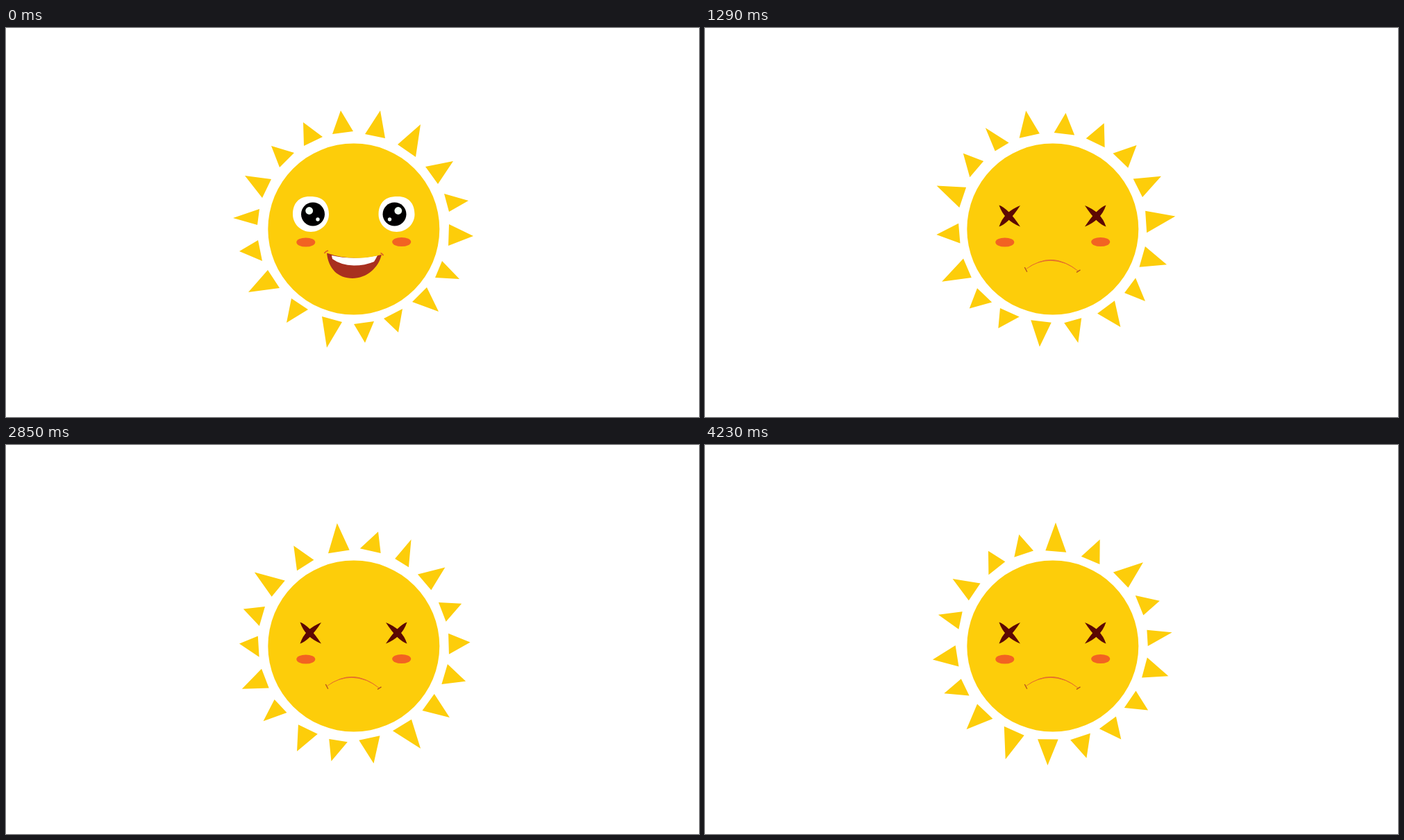
An HTML page with a canvas for the animation above (4.26 s loop, 998x561 px).

```html
<!DOCTYPE html>
<html lang="en">
<head>
<meta charset="utf-8">
<title>Sun</title>
<style>
html, body { margin: 0; width: 100%; height: 100%; overflow: hidden; background: #fff; }
canvas { display: block; width: 998px; height: 561px; }
</style>
</head>
<body>
<canvas id="stage"></canvas>
<script>
const W = 998, H = 561;
const LOOP = 4260, STEP = 30;
const SAD_AT = 450;
const SPEED = 40 * Math.PI / 180; // radians per second
const PIVOT = { x: 500, y: 288.4 };

const YELLOW = '#fdcd0a', CHEEK = '#f26322', MAROON = '#5c0803', LIP = '#a8301f', LINE = '#e5702c';

// Each ray: tip x, y and two base corners.
const RAYS = [
  [482, 119, 470, 153, 500, 149], [539, 119, 517, 153, 546, 159],
  [597, 139, 564, 168, 590, 186], [644, 192, 604, 200, 622, 225],
  [666, 249, 631, 239, 638, 265], [673, 300, 638, 283, 637, 314],
  [653, 362, 628, 336, 618, 360], [623, 409, 606, 374, 585, 395],
  [565, 439, 571, 405, 544, 419], [517, 454, 530, 423, 501, 427],
  [462, 461, 484, 424, 455, 416], [404, 425, 435, 406, 411, 390],
  [349, 381, 394, 375, 377, 349], [336, 322, 369, 336, 363, 306],
  [327, 274, 362, 284, 365, 261], [344, 213, 369, 245, 382, 218],
  [382, 170, 394, 201, 415, 180], [428, 136, 429, 170, 456, 157]
];

const canvas = document.getElementById('stage');
const ctx = canvas.getContext('2d');
const ratio = window.devicePixelRatio || 1;
canvas.width = Math.round(W * ratio);
canvas.height = Math.round(H * ratio);

const crown = new Path2D();
for (const [ax, ay, bx, by, cx, cy] of RAYS) {
  crown.moveTo(ax, ay);
  crown.lineTo(bx, by);
  crown.lineTo(cx, cy);
  crown.closePath();
}

function ellipse(x, y, rx, ry, color) {
  ctx.beginPath();
  ctx.ellipse(x, y, rx, ry, 0, 0, Math.PI * 2);
  ctx.fillStyle = color;
  ctx.fill();
}

const dot = (x, y, r, color) => ellipse(x, y, r, r, color);

function fill(path, color) {
  ctx.fillStyle = color;
  ctx.fill(new Path2D(path));
}

function line(path, color, width) {
  ctx.strokeStyle = color;
  ctx.lineWidth = width;
  ctx.stroke(new Path2D(path));
}

// Runs draw() flipped left to right, so that x becomes sum - x.
function mirrored(sum, draw) {
  ctx.save();
  ctx.translate(sum, 0);
  ctx.scale(-1, 1);
  draw();
  ctx.restore();
}

function openEye() {
  fill('M413 268.5C413 253 422 243 437 243C443 243 447 243.5 451 245' +
       'C460 248 465 258 465 268.5C465 283 453 294 439 294C425 294 413 283 413 268.5Z', '#fff');
  dot(442, 268.5, 17, '#000');
  dot(436.7, 263.5, 5.4, '#f4fff6');
  dot(449, 276, 2.7, '#f4fff6');
}

function crossEye() {
  fill('M423.5 255.5Q437 260.5 454 286.5Q430.5 277 423.5 255.5Z', MAROON);
  fill('M454 256Q437 282 423.5 286.5Q430.5 265 454 256Z', MAROON);
}

function happyFace() {
  openEye();
  mirrored(1001.5, openEye);
  fill('M462 324Q500 337 541 326C537 346 519 361 499 361C478 361 464 347 462 324Z', LIP);
  fill('M469 328Q500 335 535 328Q532 334 530 337Q517 342.5 501 342.5Q482 342 470 333Z', '#fff');
  line('M461.5 323.5Q500 337 541 326', YELLOW, 1.6);
  line('M458.5 325Q460 322 464 321M539.5 324.5Q542 325.5 543.5 328', '#dc5a25', 1.6);
}

function sadFace() {
  crossEye();
  mirrored(1001, crossEye);
  fill('M462.5 347.5Q500 319 538 351Q500 322.5 462.5 347.5Z', LINE);
  line('M462.5 347.5Q500 320.3 538 351', LINE, 0.8);
  line('M460.3 345L463.8 351.8M535 352.3L540.5 348.8', '#b8571f', 1.4);
}

function draw(time) {
  ctx.setTransform(ratio, 0, 0, ratio, 0, 0);
  ctx.fillStyle = '#fff';
  ctx.fillRect(0, 0, W, H);

  ctx.save();
  ctx.translate(PIVOT.x, PIVOT.y);
  ctx.rotate(SPEED * time / 1000);
  ctx.translate(-PIVOT.x, -PIVOT.y);
  ctx.fillStyle = YELLOW;
  ctx.fill(crown);
  ctx.restore();

  dot(500.8, 290, 123.5, YELLOW);
  ellipse(431.8, 309, 13.5, 6.6, CHEEK);
  ellipse(569.7, 308.5, 13.5, 6.6, CHEEK);
  if (time < SAD_AT) happyFace();
  else sadFace();
}

const start = performance.now();

function tick() {
  const time = (performance.now() - start) % LOOP;
  draw(Math.floor(time / STEP) * STEP);
  requestAnimationFrame(tick);
}

tick();
</script>
</body>
</html>
```
